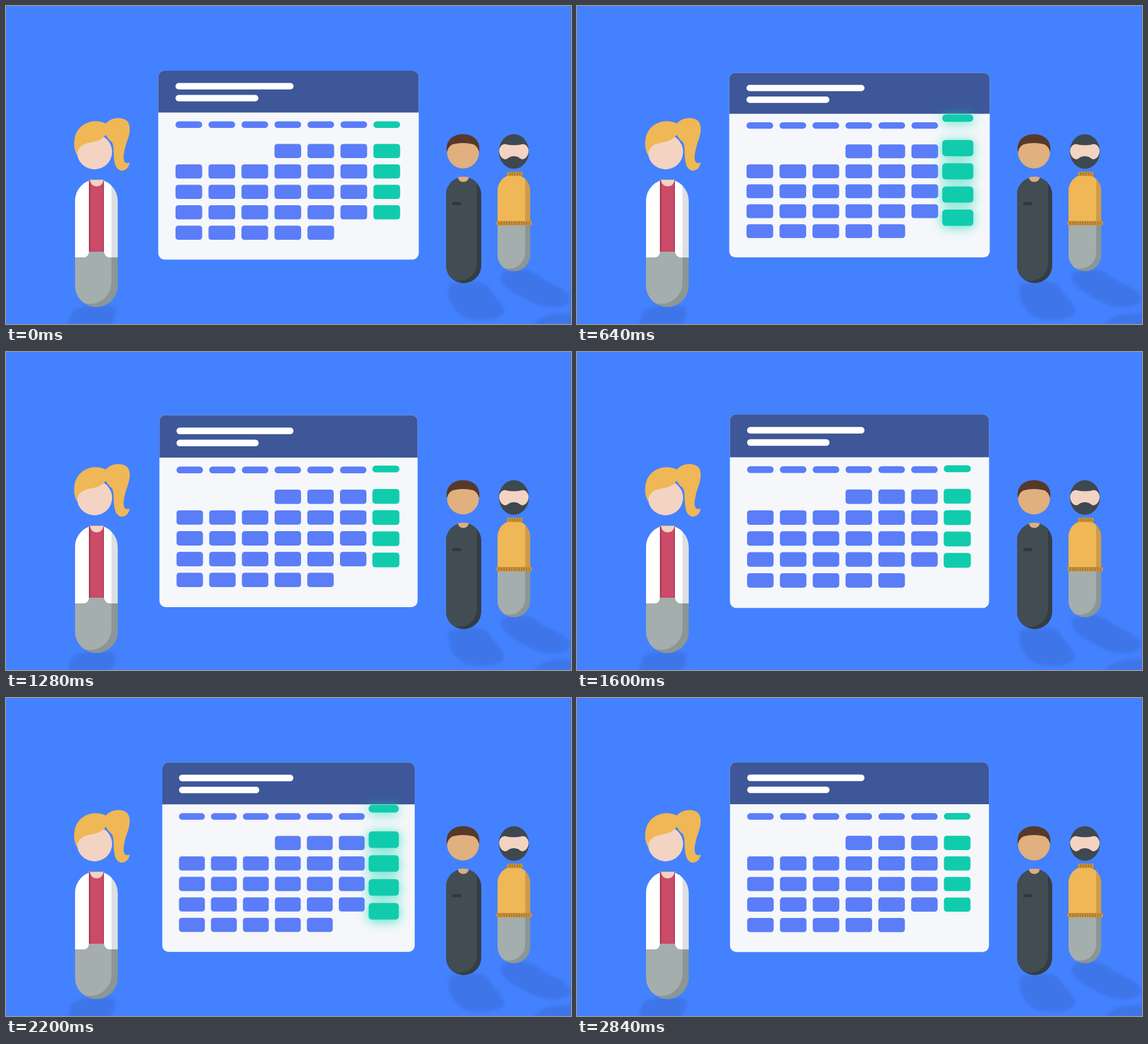
An HTML page with a canvas for the animation above (2880 ms loop, 900 px wide and 506 px high).

```html
<!DOCTYPE html>
<html lang="en">
<head>
<meta charset="utf-8">
<title>Calendar</title>
<style>
html, body { margin: 0; width: 100%; height: 100%; overflow: hidden; background: #4481ff; }
canvas { display: block; }
</style>
</head>
<body>
<canvas id="stage" width="900" height="506"></canvas>
<script>
const ctx = document.getElementById('stage').getContext('2d');
const LOOP = 2880, STEP = 40, POP = 1440;
const BLUE = '#5b7df8', GREEN = '#10ccad', GREY = '#a3aead', GREY_DARK = '#8b9695';

// Card wobble: [ms, scale], closed loops
const WIDTH = [[0, 1], [640, 1], [920, .989], [1280, .991], [1880, .994], [2200, .969], [2840, .994]];
const HEIGHT = [[0, 1], [640, .977], [920, .988], [1280, 1.017], [1560, 1.026], [1880, 1.008],
  [2200, 1.003], [2520, 1.019], [2840, 1.005]];

// Periodic cubic Hermite through the keys
function sample(keys, t) {
  const n = keys.length;
  const key = i => {
    const turn = Math.floor(i / n), [time, value] = keys[i - turn * n];
    return [time + turn * LOOP, value];
  };
  const slope = i => {
    const [a, va] = key(i - 1), [b, vb] = key(i + 1);
    return (vb - va) / (b - a);
  };
  let i = n - 1;
  while (keys[i][0] > t) i--;
  const [t0, v0] = key(i), [t1, v1] = key(i + 1);
  const d = t1 - t0, u = (t - t0) / d, u2 = u * u, u3 = u2 * u;
  return v0 * (2 * u3 - 3 * u2 + 1) + v1 * (3 * u2 - 2 * u3)
    + d * (slope(i) * (u3 - 2 * u2 + u) + slope(i + 1) * (u3 - u2));
}

function rect(x, y, w, h, color) {
  ctx.fillStyle = color;
  ctx.fillRect(x, y, w, h);
}

function round(x, y, w, h, r, color) {
  ctx.fillStyle = color;
  ctx.beginPath();
  ctx.roundRect(x, y, w, h, r);
  ctx.fill();
}

function disc(x, y, rx, ry, color) {
  ctx.fillStyle = color;
  ctx.beginPath();
  ctx.ellipse(x, y, rx, ry, 0, 0, Math.PI * 2);
  ctx.fill();
}

function shape(path, color) {
  ctx.fillStyle = color;
  ctx.fill(new Path2D(path));
}

function inside(outline, draw) {
  ctx.save();
  ctx.beginPath();
  outline();
  ctx.clip();
  draw();
  ctx.restore();
}

// Upright capsule; its lit part is a second capsule shifted left
function capsule(x, y, w, h, edge, shade, light) {
  inside(() => ctx.roundRect(x, y, w, h, w / 2), () => {
    shade();
    inside(() => ctx.roundRect(x - edge, y - w, w, h + w - edge / 2, w / 2), light);
  });
}

function scaled(x, y, sx, sy, draw) {
  ctx.save();
  ctx.translate(x, y);
  ctx.scale(sx, sy);
  ctx.translate(-x, -y);
  draw();
  ctx.restore();
}

function groundShadows() {
  ctx.save();
  ctx.filter = 'blur(2px)';
  const color = '#3e76e9';
  shape('M104 488C112 474 160 474 174 480C176 494 170 502 164 510L98 510Z', color);
  shape('M706 444C720 438 758 434 768 446C778 464 796 476 793 488C784 502 746 502 728 494C708 482 702 460 706 444Z', color);
  shape('M788 428C798 416 832 414 852 432C870 444 900 452 899 468C890 484 856 482 834 470C812 458 786 446 788 428Z', color);
  shape('M842 506C850 492 880 486 904 490V510H842Z', color);
  ctx.restore();
}

function woman() {
  capsule(110, 276, 68, 203, 10, () => {
    rect(110, 276, 68, 125, '#dcdfe3');
    rect(110, 400, 68, 80, GREY_DARK);
  }, () => {
    rect(100, 270, 80, 131, '#ffffff');
    rect(100, 400, 80, 80, GREY);
  });
  // Open coat over a red top
  shape('M132 276H156V391C157 397 161 400 167 401H122C128 400 132 397 132 391Z', GREY);
  rect(132, 277, 24, 114, '#cb4b69');
  rect(132, 278, 3, 113, '#b23f5d');
  rect(154, 278, 2, 113, '#b23f5d');
  shape('M134 277H155C155 283 150 287 144.500 287C139 287 134 283 134 277Z', '#f3d3c2');

  disc(141, 232, 28, 28, '#f3d3c2');
  shape('M113 237C107 228 107 210 113 200C122 184 143 179 159 187C166 178 183 175 192 182'
    + 'C199 188 198 201 194 212C189 226 186 239 188 246C189 250 193 251 197 249'
    + 'C196 257 190 263 183 262C176 260 173 253 172 242C171 229 172 220 168 216'
    + 'C164 213 162 210 159 205C151 215 141 216 131 218C119 221 114 227 113 237Z', '#efb755');
}

function manInBlack() {
  capsule(701, 272, 56, 169, 7, () => rect(701, 270, 56, 172, '#343d43'),
    () => rect(690, 260, 70, 182, '#424c53'));
  shape('M720 272.500Q728.500 270.500 737 272.500C737 277 733 280 728.500 280C724 280 720 277 720 272.500Z', '#deae7c');
  rect(711, 312, 14, 5, '#30383e');
  disc(728, 232.500, 25.500, 26, '#e0b07e');
  shape('M702.500 233C699 216 710 204 728 204C746 204 757 216 753.500 233'
    + 'C752 226 749 222 744 220Q728 216 712 220C707 222 704 226 702.500 233Z', '#56392b');
}

function ribs(x, y, w, h, gap) {
  round(x, y, w, h, 2, '#c78f38');
  for (let i = gap; i < w - 1; i += gap) rect(x + i, y + 1, 1, h - 2, '#966d2e');
}

function manInYellow() {
  capsule(783, 268, 52, 154, 8, () => {
    rect(783, 266, 52, 80, '#cf9b48');
    rect(783, 346, 52, 78, GREY_DARK);
  }, () => {
    rect(773, 260, 62, 86, '#efb755');
    rect(773, 346, 62, 78, GREY);
  });
  ribs(798, 263.500, 25, 7, 4);
  ribs(781, 342, 57, 7, 4);
  disc(809, 231.500, 24, 27.500, '#3e4850');
  shape('M785.500 229C787 223 791 219 796 220Q809 223 822 220C827 219 831 223 832.500 229'
    + 'C833 236 829 243 823 244C819 244 817 239 809 239C801 239 799 244 795 244C789 243 785 236 785.500 229Z', '#f3d3c2');
}

function column(i, color) {
  const x = 270 + 52.55 * i;
  round(x, 183.5, 42.5, 10.5, 5.25, color);
  const first = i < 3 ? 1 : 0, last = i < 5 ? 4 : 3;
  for (let r = first; r <= last; r++) round(x, 219.5 + 32.5 * r, 42.5, 22.5, 4.5, color);
}

function card(t) {
  const pop = (1 - Math.cos(t / POP * Math.PI * 2)) / 2;
  scaled(450, 253, sample(WIDTH, t), sample(HEIGHT, t), () => {
    round(242.5, 103, 415, 300.5, 10, '#f5f7fa');
    round(242.5, 103, 415, 66.5, [10, 10, 0, 0], '#3d5798');
    round(270, 122.5, 188, 10.3, 5.1, '#ffffff');
    round(270, 141.5, 132, 10.3, 5.1, '#ffffff');
    for (let i = 0; i < 6; i++) column(i, BLUE);
    const grow = 1 + .168 * pop;
    scaled(606.5, 263, grow, grow, () => {
      ctx.shadowColor = `rgba(16, 215, 178, ${.75 * pop})`;
      ctx.shadowBlur = 18 * pop;
      ctx.shadowOffsetY = 2 * pop;
      column(6, GREEN);
    });
  });
}

function frame(now) {
  const t = Math.floor(now % LOOP / STEP) * STEP;
  rect(0, 0, 900, 506, '#4481ff');
  groundShadows();
  card(t);
  woman();
  manInBlack();
  manInYellow();
  rect(899, 0, 1, 506, '#3c70dc');
}

const start = performance.now();
function tick() {
  frame(performance.now() - start);
  requestAnimationFrame(tick);
}
tick();
</script>
</body>
</html>
```
